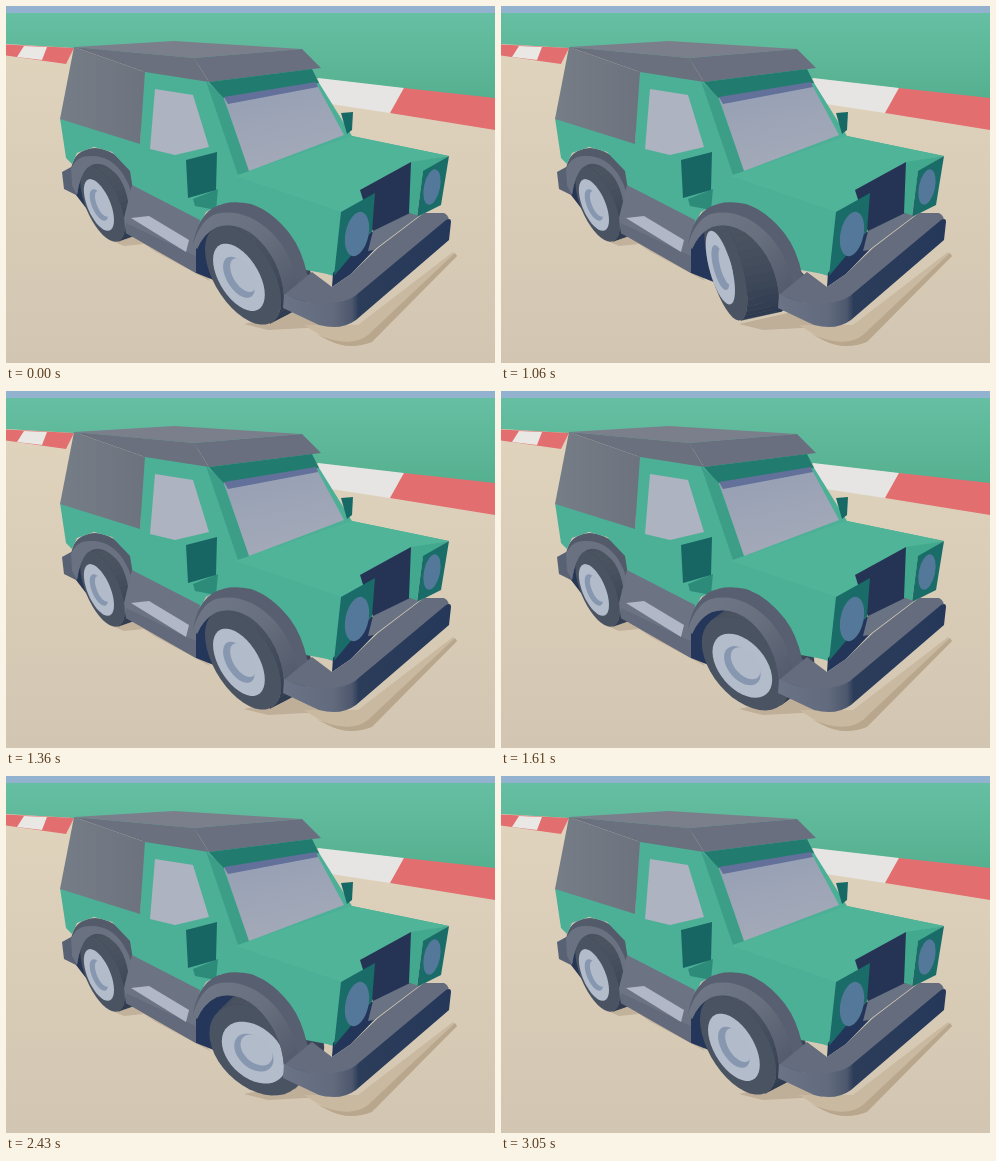
These frames come from a looping animation (489x357 px, 3.18 s). An HTML page:

```html
<!DOCTYPE html>
<html lang="en">
<head>
<meta charset="utf-8">
<title>Steering car</title>
<style>
html, body { margin: 0; width: 100%; height: 100%; overflow: hidden; background: #d8c9b2; }
svg { display: block; width: 100vw; height: 100vh; }
</style>
</head>
<body>
<svg viewBox="0 0 489 357" preserveAspectRatio="none" stroke-linejoin="round">
  <defs>
    <linearGradient id="sand" x1="0" y1="0" x2="0" y2="1">
      <stop offset="0" stop-color="#e2d5be"/><stop offset="1" stop-color="#d2c6b2"/>
    </linearGradient>
    <linearGradient id="grass" x1="0" y1="0" x2="0" y2="1">
      <stop offset="0" stop-color="#66bfa2"/><stop offset="1" stop-color="#55b090"/>
    </linearGradient>
    <linearGradient id="glass" x1="0" y1="0" x2=".3" y2="1">
      <stop offset="0" stop-color="#959fb4"/><stop offset="1" stop-color="#a3a9b8"/>
    </linearGradient>
    <linearGradient id="canvas" x1="0" y1="0" x2="1" y2="0">
      <stop offset="0" stop-color="#757d87"/><stop offset="1" stop-color="#6d737e"/>
    </linearGradient>
    <linearGradient id="flare" x1="0" y1="0" x2="1" y2=".8">
      <stop offset="0" stop-color="#707887"/><stop offset=".55" stop-color="#686f7e"/><stop offset="1" stop-color="#545c6e"/>
    </linearGradient>
    <linearGradient id="nose" x1="0" y1="0" x2="1" y2="0">
      <stop offset="0" stop-color="#6b7486"/><stop offset=".3" stop-color="#626b7d"/><stop offset=".41" stop-color="#4d576d"/><stop offset=".45" stop-color="#2c3d5a"/><stop offset="1" stop-color="#26385a"/>
    </linearGradient>
  </defs>

  <!-- track -->
  <rect width="489" height="357" fill="url(#sand)"/>
  <rect width="489" height="7" fill="#93b2d0"/>
  <path d="M0 7H489V93L316 73 67 42 0 38Z" fill="url(#grass)"/>
  <path d="M0 38.500 68 42 60 58 0 49.500Z" fill="#e36e70"/>
  <path d="M18 40 41 41 36 54 11 51Z" fill="#e9e8e5"/>
  <path d="M312 72 398 82 384 107 318 97Z" fill="#e6e5e3"/>
  <path d="M398 82 489 92V124L384 107Z" fill="#e36e70"/>

  <!-- shadows -->
  <path d="M104 234 122 228 200 268 204 275 150 246 138 238 118 240Z" fill="#c2b29c"/>
  <path d="M238 318 300 304 326 319 300 322 262 324Z" fill="#bfae98"/>
  <path d="M298 319 322 334Q346 345 365 335L451 250 447 246 352 319Z" fill="#cab9a1"/>
  <path d="M310 328Q344 343 362 329L449 247 451 250 366 336Q343 345 322 334Z" fill="#b9a78d"/>

  <!-- rear wheel and arch -->
  <path d="M70 189 74 162 92 154 112 164 126 212 90 215Z" fill="#263654"/>
  <g id="rear"></g>
  <path d="M56 166 67 160 74 163 70 189 58 183Z" fill="#596174"/>
  <path d="M65 163Q68 143 89 142 109 143 123 163 133 177 137 205L124 215Q123 178 107 165 93 152 81 162 74 169 71 189L66 180Z" fill="#535b6b"/>
  <path d="M65 163Q70 150 84 150 104 149 117 168 129 187 130 211L124 215Q123 178 107 165 93 152 81 162 74 169 71 189L66 180Z" fill="#6a7281"/>

  <!-- front wheel and arch -->
  <path d="M190 267 190 236 203 214 235 212 270 232 304 270 300 302 278 302Z" fill="#24365a"/>
  <g id="front"></g>

  <!-- cabin -->
  <path d="M54 112 134 137 137 65 202 74 305 64 346 130 443 150 404 157 354 185 368 187 327 269 300 264 280 224 250 200 220 196 200 206 190 225 128 190 124 165 106 146 88 141 71 147 66 158 60 152Z" fill="#4cb097"/>
  <path d="M68 41 139 66 134 138 54 113Z" fill="url(#canvas)"/>
  <path d="M68 41 168 35 296 43 188 52Z" fill="#7b7f8c"/>
  <path d="M68 41 188 52 203 76 139 66Z" fill="#6a707d"/>
  <path d="M188 52 296 43 315 62 203 76Z" fill="#696f7f"/>
  <path d="M203 76 306 63 313 77 217 92Z" fill="#217c6f"/>
  <path d="M200 75 217 91 244 165 232 169Z" fill="#3c9e87"/>
  <path d="M218 92 310 77 338 129 243 165Z" fill="url(#glass)"/>
  <path d="M218 91 310 76 312 81 222 98Z" fill="#62709a"/>
  <path d="M149 83 187 89 203 141 169 149 144 143Z" fill="#adb3c0"/>
  <path d="M335 107 347 106 346 124 341 128Z" fill="#176965"/>

  <!-- sill -->
  <path d="M126 179 194 214 190 238V267L120 227 118 212Z" fill="#6c7484"/>
  <path d="M120 217 181 246 190 250V267L120 227Z" fill="#626a7b"/>
  <path d="M125 212 143 210 183 234 180 246Z" fill="#b1b7c6"/>

  <!-- bonnet -->
  <path d="M229 170 346 130 443 150 405 156 354 184 368 187 335 206Z" fill="#50b499"/>
  <path d="M229 170 335 206 327 270 307 263 284 226 256 203 212 198Z" fill="#4bb096"/>
  <path d="M187 193 212 183 210 204 189 200Z" fill="#2c8c79"/>
  <path d="M180 154 211 146 210 184 182 192Z" fill="#176663"/>

  <!-- nose -->
  <path d="M326 281 327 267 366 225 374 238 345 268Z" fill="#24355a"/>
  <path d="M354 184 405 156 406 208 367 226Z" fill="#253455"/>
  <path d="M335 206 369 187 366 225 328 270Z" fill="#196c67"/>
  <ellipse cx="351" cy="228" rx="11.5" ry="22.500" transform="rotate(12 351 228)" fill="#537899"/>
  <path d="M405 156 443 150 417 166 411 210 403 207Z" fill="#43a98e"/>
  <path d="M417 165 443 150 435 199 411 211Z" fill="#196c67"/>
  <ellipse cx="426" cy="181" rx="8" ry="18" transform="rotate(12 426 181)" fill="#537899"/>
  <path d="M367 225 404 207 413 210 368 244 362 245Z" fill="#697384"/>

  <!-- front flare and bumper -->
  <path d="M187 238Q192 211 207 202 222 193 245 198 266 205 284 228 296 244 301 268L312 276 300 301 278 290Q275 254 250 231 231 215 211 221 198 227 191 243Z" fill="#575f70"/>
  <path d="M187 238Q195 213 210 208 239 201 266 227 286 247 292 280L278 290Q275 254 250 231 231 215 211 221 198 227 191 243Z" fill="url(#flare)"/>
  <path d="M278 289 306 266 326 281 345 268 372 242 418 207 438 207Q446 211 440 218L348 292Q327 301 304 297Z" fill="#646c7d"/>
  <path d="M278 288Q298 298 314 297 338 298 349 290L440 214Q445 211 445 216L443 234 350 314Q335 325 313 319L277 302Z" fill="url(#nose)"/>
</svg>
<script>
const LOOP = 3180;
// [start ms, wheel angle in degrees], each held until the next
const steer = [
  [0, 0], [360, 3], [430, 9], [500, 24],
  [1060, 22], [1170, 15], [1230, 9], [1300, 4], [1360, 0],
  [1610, -10], [1680, -19],
  [2430, -17], [2500, -7], [2550, 0]
];
const SIDES = 40, TAU = Math.PI * 2;

function mix(a, b, k) {
  return `rgb(${a.map((v, i) => Math.round(v + (b[i] - v) * k))})`;
}

function wheel(x, y, scale, deg) {
  const c = Math.cos(deg * Math.PI / 180), s = Math.sin(deg * Math.PI / 180);
  // point on a circle of radius r, at distance d out along the axle
  const at = (r, d, a) => {
    const f = r * Math.cos(a), u = r * Math.sin(a);
    return [x + scale * (f * c - d * s), y + scale * (.7 * f * s + .5 * d * c - .8 * u)];
  };
  const shape = (pts, fill, edge) =>
    `<polygon points="${pts.map(p => p.map(v => v.toFixed(2)).join()).join(' ')}" fill="${fill}"${edge ? ` stroke="${fill}" stroke-width=".6"` : ''}/>`;
  const disc = (r, d, fill) =>
    shape(Array.from({ length: SIDES }, (_, i) => at(r, d, i * TAU / SIDES)), fill);

  let out = disc(53, 12, '#303c52');
  for (let i = 0; i < SIDES; i++) {
    const a = i * TAU / SIDES, b = a + TAU / SIDES;
    const q = [at(53, 56, a), at(53, 56, b), at(53, 12, b), at(53, 12, a)];
    const turn = (q[1][0] - q[0][0]) * (q[2][1] - q[0][1]) - (q[1][1] - q[0][1]) * (q[2][0] - q[0][0]);
    if (turn > 0) out += shape(q, mix([36, 50, 74], [76, 84, 97], (Math.sin(a) + 1) / 2), true);
  }
  return out + disc(53, 56, '#4a5362') + disc(36, 62, '#b3bcca') +
    disc(22, 62, '#8797b0') + disc(18, 56, '#b2bbca');
}

const front = document.getElementById('front');
let shown = null;
document.getElementById('rear').innerHTML = wheel(130, 186, .73, 55);

function draw(now) {
  const t = now % LOOP;
  const angle = steer.filter(k => k[0] <= t).pop()[1];
  if (angle !== shown) {
    front.innerHTML = wheel(276, 249, 1, 44 + angle);
    shown = angle;
  }
}

const start = performance.now();
function tick() {
  draw(performance.now() - start);
  requestAnimationFrame(tick);
}
tick();
</script>
</body>
</html>
```
